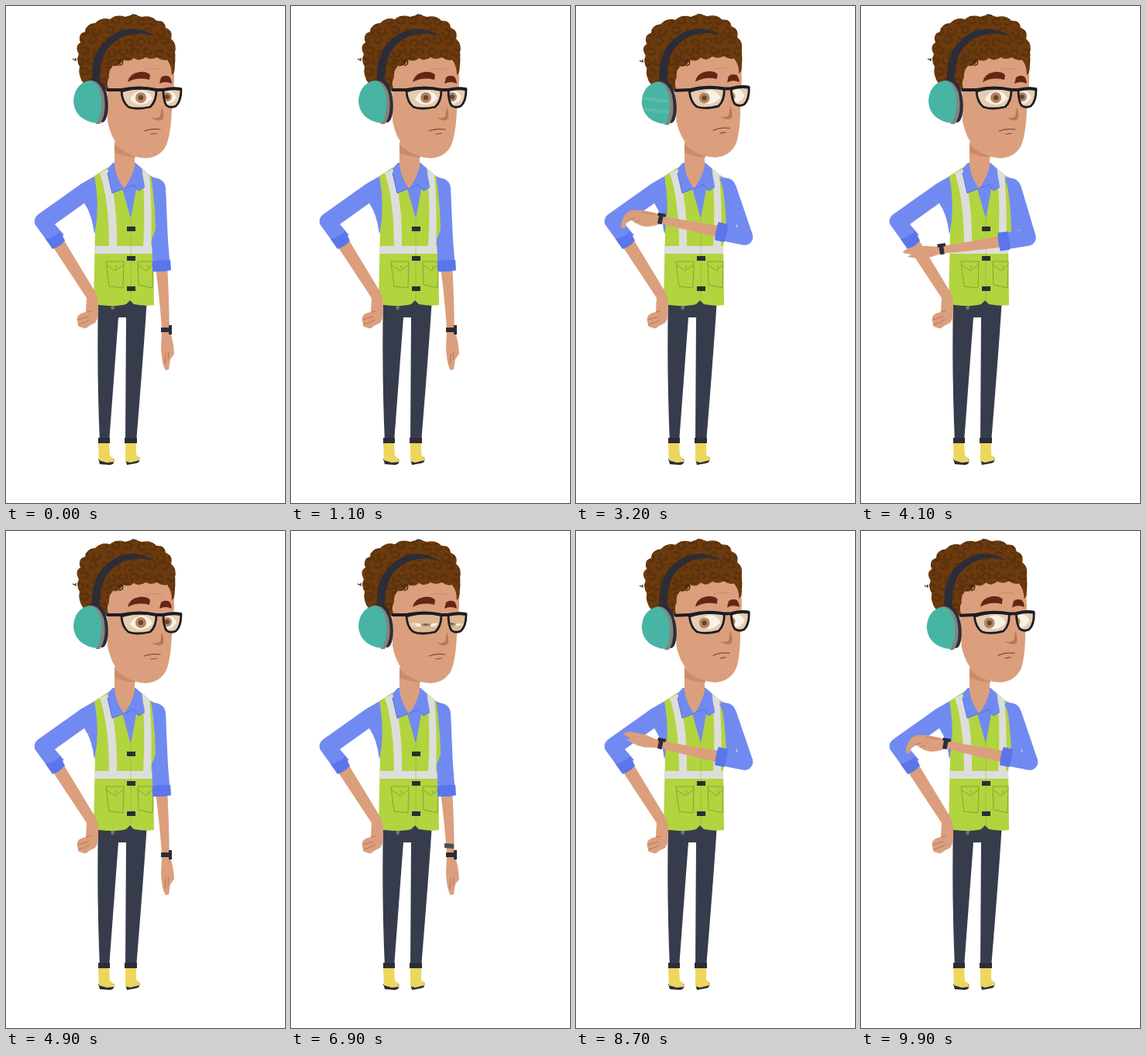
Recreate the animation shown at these times as an HTML page. Size 360 by 640 pixels, loop 10000 ms.

```html
<!DOCTYPE html>
<html lang="en">
<head>
<meta charset="utf-8">
<title>Worker checking his watch</title>
<style>
html, body { margin: 0; width: 100%; height: 100%; overflow: hidden; background: #fff; }
svg { display: block; width: 360px; height: 640px; }
.skin { fill: #db9f7d; }
.shirt { fill: #718af1; }
.cuff { fill: #5a76ea; }
.lime { fill: #b2d43f; }
.tape { fill: #dddeda; }
.dark { fill: #2c2d38; }
.crease { fill: none; stroke: #b5775a; stroke-width: 1; stroke-linecap: round; }
.seam { fill: none; stroke: #88a52c; stroke-width: 1; }
.fold { fill: none; stroke: #5570df; stroke-width: 1; }
.frame { fill: none; stroke: #1c1d22; stroke-width: 2.8; stroke-linejoin: round; }
.rim { fill: none; stroke: #1c1d22; stroke-width: 4; stroke-linecap: round; }
</style>
</head>
<body>
<svg viewBox="0 0 360 640">
  <defs>
    <clipPath id="hairClip"><path id="hairShape" d="M101 101Q92 89 95 78Q90 70 94 62Q88 52 96 47Q92 36 102 33Q103 23 115 22Q123 14 134 17Q143 10 154 14Q165 9 175 14Q187 11 194 19Q205 18 206 28Q216 32 213 42Q221 50 218 59Q219 68 217 85L214 89Q214 77 208 69Q201 71 195 66Q187 70 180 66Q172 72 165 67Q159 73 151 69Q147 79 138 77Q132 83 133 92Q129 98 132 106L118 112Z"/></clipPath>
    <clipPath id="lensL"><path id="rimL" d="M149 110Q172 103 194 108Q194 123 186 130Q168 134 158 130Q150 124 149 110Z"/></clipPath>
    <clipPath id="lensR"><path id="rimR" d="M203 108Q215 105 226 107Q226 123 219 129Q212 132 207 128Q203 122 203 108Z"/></clipPath>
  </defs>

  <!-- legs and boots -->
  <path fill="#363c4c" d="M119 376H182Q178 440 168 562H154L155 401H145L133 562H121Q117 470 119 376Z"/>
  <path class="dark" d="M119 556H134V563H119ZM153 556H169V563H153Z"/>
  <path class="dark" d="M119 583L139 583Q141 590 134 591L121 590ZM154 583L172 581Q174 588 167 589L156 591Z"/>
  <path fill="#edd65c" d="M119 563H133L134 579Q140 583 139 587L130 588L120 585ZM154 563H168V578Q173 581 172 585L160 588L154 586Z"/>
  <path fill="#77736a" d="M135 385H141L139 391H136Z"/>

  <!-- torso -->
  <path class="shirt" d="M118 217L97 229L42 268Q34 274 38 282L54 304L75 295L63 281L101 254Q111 268 114 294L122 260Z"/>
  <path class="shirt" d="M138 202L128 212L140 245L162 275L180 240L194 292L207 288L206 235Q205 228 202 226L187 219L167 202Z"/>
  <path class="skin" d="M140 175H166V207Q162 222 152 236Q142 222 140 205Z"/>
  <path fill="#c98d6b" d="M140 178Q152 190 167 192V195Q152 194 140 189Z"/>
  <path class="lime" d="M131 208L114 219Q121 258 115 290L113 384Q140 388 155 384L160 379L165 384Q180 387 191 385L190 308L194 288Q193 250 187 219L175 209L179 233L168 236L161 274L150 235L137 241Z"/>
  <path class="tape" d="M121 215L131 210Q144 250 143 311H133Q133 250 121 215ZM176 210L185 217Q189 260 187 311H177Q180 260 176 210ZM114 309H190V319H114Z"/>
  <path class="shirt" d="M138 202L131 215L137 241L152 235Q141 219 138 202ZM167 202Q177 213 179 233L171 238L165 230L152 236Q166 220 167 202Z"/>
  <path class="fold" d="M131 215L137 241L152 235L165 230L171 238L179 233"/>
  <path class="seam" opacity=".4" d="M161 274V379"/>
  <path class="seam" d="M129 329H152L151 363L133 361ZM129 333L141 341L152 333M170 329H190L189 363L171 359ZM170 333L181 341L190 333M142 334V338M183 334V338"/>
  <path class="dark" d="M156 284H167V290H156ZM156 322H167V328H156ZM156 361H167V367H156Z"/>

  <!-- hand on the hip -->
  <path class="skin" d="M61 311L75 302L112 363Q119 371 119 386Q120 402 115 408L107 412Q103 417 98 414Q92 413 93 410Q91 403 92 401Q93 396 103 394L104 376Z"/>
  <path class="crease" d="M93 404Q100 402 106 400M94 410Q102 408 108 404M104 394L109 393"/>
  <path class="cuff" d="M51 300Q62 298 70 290L76 302Q70 310 60 313Z"/>

  <!-- head -->
  <g id="head">
    <path class="skin" d="M130 70L131 148Q135 170 147 182Q160 195 180 196Q199 195 207 179Q213 163 214 132L217 98V66L200 55H145Z"/>
    <use href="#hairShape" fill="#6d3a0d"/>
    <g clip-path="url(#hairClip)"><path id="curls" fill="none" stroke="#54300f" stroke-width="3" stroke-linejoin="round" opacity=".75"/></g>
    <path fill="none" stroke="#34200d" stroke-width="1.2" d="M86 68L90 70V67M145 72L148 69L151 71L150 75L146 77M161 14L163 11L169 12"/>
    <path class="dark" d="M111 104Q108 62 129 44Q157 18 194 39Q160 29 138 48Q119 63 121 104Z"/>
    <ellipse class="dark" cx="122" cy="123" rx="9.5" ry="27" transform="rotate(-5 122 123)"/>
    <path fill="#84837f" d="M108 96Q120 95 126 112Q131 138 121 152L116 152Z"/>
    <path fill="#47b4a4" d="M107 96Q88 101 87 123Q89 147 117 151Q125 138 123 117Q119 97 107 96Z"/>
    <path id="gloss" fill="none" stroke="#5cbbaa" stroke-width="4" d="M89 117L121 122M90 131L121 136"/>

    <path fill="#6a2415" d="M157 98Q159 87 172 85Q182 84 186 89L185 95Q170 91 157 98ZM198 100L200 92Q205 88 211 91Q214 95 214 100Q206 96 198 100Z"/>
    <path class="crease" opacity=".5" d="M181 82Q192 79 201 82"/>
    <path fill="#b97953" d="M201 130Q205 141 202 146Q196 150 187 143Q195 146 199 142Z"/>
    <path fill="none" stroke="#874b39" stroke-width="1.2" stroke-linecap="round" d="M178 161Q188 157 199 159M187 165L194 164"/>

    <g clip-path="url(#lensL)">
      <path fill="#e6ccb0" d="M147 102H197V136H147Z"/>
      <path fill="#f8f1e6" d="M160 120Q165 109 177 109Q186 111 189 119Q182 127 173 127Q164 126 160 120Z"/>
      <g class="iris"><circle fill="#b38763" cx="174" cy="118" r="7"/><circle fill="#70442a" cx="174" cy="118" r="3.2"/></g>
      <path class="lid" fill="#dcb793" d="M148 103H197V118Q174 121 158 118L148 120ZM155 124Q175 121 192 124L185 133H160Z"/>
    </g>
    <g clip-path="url(#lensR)">
      <path fill="#e6ccb0" d="M200 102H229V136H200Z"/>
      <path fill="#f8f1e6" d="M200 118Q203 109 211 109Q218 111 220 118Q215 126 208 126Q202 125 200 118Z"/>
      <g class="iris"><circle fill="#b38763" cx="208" cy="117" r="6"/><circle fill="#70442a" cx="208" cy="117" r="3"/></g>
      <path class="lid" fill="#dcb793" d="M200 103H229V118Q212 121 200 117ZM202 123Q214 121 226 123L218 133H206Z"/>
    </g>
    <use href="#rimL" class="frame"/>
    <use href="#rimR" class="frame"/>
    <path class="rim" d="M131 108L149 108Q172 103 194 108L203 108Q215 105 225 107"/>
  </g>

  <!-- watch arm -->
  <g id="upper">
    <path class="shirt" d="M188 221Q205 221 206 236L209 302H188L193 287L192 262Z"/>
    <circle class="shirt" cx="198.5" cy="302" r="10.5"/>
    <g id="fore">
      <path class="skin" d="M-7.5 38H7.5Q7 75 4.8 118H-4.8Q-5 75 -7.5 38Z"/>
      <path class="shirt" d="M-10.5 0H10.5L11 30H-11Z"/>
      <path class="cuff" d="M-11.5 26Q0 24 12 26L12 39Q0 41 -12 39Z"/>
      <g id="rest" transform="rotate(3.7) translate(-198.5 -302)">
        <path class="skin" d="M201 418L200 440Q201 462 206 469L210 468L212 455L217 448Q216 430 211 418Z"/>
        <path class="crease" d="M206 448L205 460M210 446L209 456"/>
        <path class="dark" d="M200 414H210V411H214V423H210V420H200Z"/>
      </g>
      <path class="skin" id="flat" transform="rotate(-1.5) translate(-198.5 -302)" d="M191 418Q190 430 187 439L186 462Q188 470 191 471L195 460L197 466L202 450L203 440L200 418Z"/>
      <g id="pinch" transform="scale(1 1.053) rotate(-101.8) translate(-218 -297.5)">
        <path class="skin" d="M108 268Q88 262 73 263Q61 265 58 284Q61 288 64 285Q65 277 70 275L77 279Q88 288 108 281Z"/>
        <path class="crease" d="M70 275L77 273M76 279L83 276M84 265Q92 268 102 268"/>
      </g>
      <path class="dark" id="watch" d="M-8 111H-4V114H6V120H-4V122H-8Z"/>
    </g>
  </g>
  <path id="strap" fill="#4b4f54" d="M198 402L210 403V409L198 408Z"/>
</svg>
<script>
const $ = id => document.getElementById(id);
const LOOP = 10000, STEP = 100;
const UP = 101.8, DOWN = -3.7;

// time, upper arm angle, forearm angle, head turn, hand
const lift = [
  [0, 0, 1.5, 0, "flat"],
  [100, -6, 26, .4, "flat"],
  [200, -12, 65, .8, "flat"],
  [300, -15.5, 94, 1, "flat"],
  [400, -16.2, UP, 1, "flat"],
  [500, -16.2, UP, 1, "pinch"]
];
const drop = [
  [0, -16.2, UP, .5, "flat"],
  [100, -14, 82, 0, "flat"],
  [200, -9, 48, 0, "flat"],
  [300, -3, 14, 0, "flat"],
  [400, 0, DOWN, 0, "rest"]
];
const at = (start, steps) => steps.map(([t, ...pose]) => [start + t, ...pose]);
const poses = [[0, 0, DOWN, 0, "rest"], ...at(1900, lift), ...at(4000, drop), ...at(8300, lift)];

const show = (el, on) => el.style.display = on ? "" : "none";
const within = (t, a, b) => t >= a && t < b;

function drawCurls() {
  let seed = 11, d = "";
  const rnd = () => (seed = seed * 16807 % 2147483647) / 2147483647;
  for (let row = 0; row < 7; row++) {
    for (let col = 0; col < 9; col++) {
      const x = 92 + col * 16 + row % 2 * 8 + rnd() * 4;
      const y = 18 + row * 13 + rnd() * 4;
      const turn = rnd() * 6.3;
      for (let k = 0; k < 6; k++) {
        const a = turn + k * 1.1, r = 7 - k * .6;
        d += (k ? "L" : "M") + (x + r * Math.cos(a)).toFixed(1) + " " + (y + r * .8 * Math.sin(a)).toFixed(1);
      }
    }
  }
  $("curls").setAttribute("d", d);
}

function draw(t) {
  const [, upper, fore, turn, hand] = poses.findLast(p => p[0] <= t);
  // the raised forearm is slightly foreshortened
  const reach = 1 - .05 * (fore - DOWN) / (UP - DOWN);
  $("head").setAttribute("transform", `rotate(${-1.9 * turn} 150 190)`);
  $("upper").setAttribute("transform", `rotate(${upper} 192 232)`);
  $("fore").setAttribute("transform", `translate(198.5 302) rotate(${fore - upper}) scale(1 ${reach})`);
  for (const id of ["rest", "flat", "pinch"]) show($(id), id === hand);
  show($("watch"), hand !== "rest");

  const blink = within(t, 500, 600) || within(t, 6900, 7000);
  for (const lid of document.querySelectorAll(".lid")) show(lid, blink);
  for (const iris of document.querySelectorAll(".iris"))
    iris.setAttribute("transform", `translate(${-6 * turn} ${turn})`);
  show($("gloss"), within(t, 1900, 4000));
  show($("strap"), within(t, 6900, 7000));
}

drawCurls();
const start = performance.now();
function tick() {
  const t = (performance.now() - start) % LOOP;
  draw(Math.floor(t / STEP) * STEP);
  requestAnimationFrame(tick);
}
tick();
</script>
</body>
</html>
```
